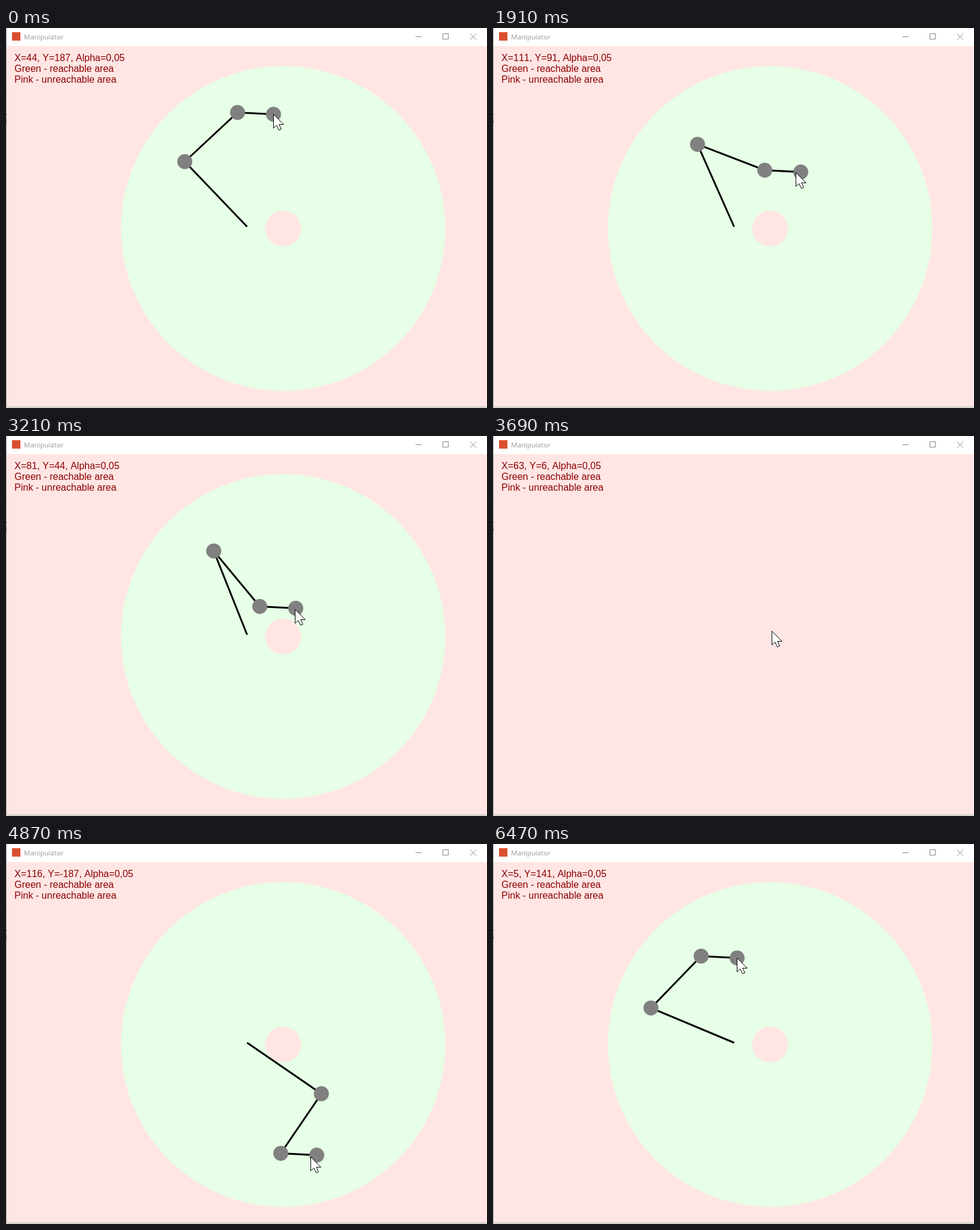
These frames come from a looping animation (801x632 px, 7180 ms). An HTML page:

```html
<!DOCTYPE html>
<html lang="en">
<head>
<meta charset="utf-8">
<title>Manipulator</title>
<style>
  html, body { margin: 0; width: 100%; height: 100%; overflow: hidden; background: #fff; }
  svg { display: block; width: 801px; height: 632px; }
  .title { font: 11.5px "Open Sans", "Noto Sans", sans-serif; fill: #999; }
  .info { font: 16px "Liberation Sans", Arial, sans-serif; font-kerning: none; fill: #8b0000; }
  .pink { fill: #ffe6e4; }
  .buttons { fill: none; stroke: #888; }
  #bones { fill: none; stroke: #000; stroke-width: 3; }
  #joints { fill: #808080; }
  #cursor { fill: #fff; stroke: #000; }
</style>
</head>
<body>
<svg viewBox="0 0 801 632">
  <rect width="801" height="632" fill="#fff"/>
  <rect x="10" y="7" width="14" height="14" fill="#d9502e"/>
  <text class="title" x="30" y="19">Manipulator</text>
  <g class="buttons">
    <path d="M682 14.5H692"/>
    <rect x="727.5" y="9.5" width="9" height="9"/>
    <path d="M773 9.5L783 19.5M783 9.5L773 19.5"/>
  </g>
  <rect class="pink" x="1" y="30" width="800" height="600"/>
  <g id="arm">
    <circle cx="461.5" cy="333.5" r="270" fill="#e6ffe6"/>
    <circle class="pink" cx="461.5" cy="333.5" r="30"/>
    <path id="bones"/>
    <g id="joints"><circle r="12.5"/><circle r="12.5"/><circle r="12.5"/></g>
  </g>
  <path d="M.5 0V631M0 630.5H801" stroke="#a0a0a0" fill="none"/>
  <path d="M.5 111v1M.5 143v2M.5 150v1M.5 154v4" stroke="#444" fill="none"/>
  <g class="info">
    <text id="pose" x="14" y="55"></text>
    <text x="14" y="73">Green - reachable area</text>
    <text x="14" y="91">Pink - unreachable area</text>
  </g>
  <path id="cursor" d="M.5 .5V23.5L5.7 18.8L9.5 26.8L13.3 25.2L9.8 17.5H17.3Z"/>
</svg>
<script>
const LOOP = 7180, STEP = 70, LEAD = 13;
const UPPER = 150, FORE = 120, PALM = 60, ALPHA = 0.05;
const BASE = { x: 401.5, y: 330.5 };

// Turning points of the mouse: time, x, y (y up, from the shoulder); a repeat is a pause
const keys = [
  [0, 44, 187], [580, 44, 187], [930, 94, 198], [1210, 86, 221], [1420, 70, 228],
  [1840, 123, 97], [1910, 111, 91], [1980, 60, 86], [2600, 53, -24], [2720, 53, -24],
  [2860, 55, -5], [3000, 88, 60], [3560, 63, 6], [3690, 63, 6], [4110, 31, 145],
  [4530, 203, 125], [4740, 232, -80], [4870, 116, -187], [5010, 30, -158],
  [5360, -86, -37], [5770, 10, 190], [5900, 10, 190], [6470, 5, 141], [LOOP, 5, 141]
];

const $ = id => document.getElementById(id);
const joints = $('joints').children;

const keyBefore = t => keys.findLastIndex(k => k[0] <= t);
const still = (a, b) => a[1] === b[1] && a[2] === b[2];

function slope(i, axis) {
  const a = keys[i - 1], p = keys[i], b = keys[i + 1];
  if (!a || !b || still(a, p) || still(p, b)) return 0;
  return (b[axis] - a[axis]) / (b[0] - a[0]);
}

// Cubic Hermite spline through the keys
function mouseAt(t) {
  const i = keyBefore(t), a = keys[i], b = keys[i + 1];
  const d = b[0] - a[0], u = (t - a[0]) / d;
  const mix = axis =>
    a[axis] * (1 + 2 * u) * (1 - u) ** 2 + b[axis] * u * u * (3 - 2 * u) +
    d * u * (1 - u) * (slope(i, axis) * (1 - u) - slope(i + 1, axis) * u);
  return { x: Math.round(mix(1)), y: Math.round(mix(2)) };
}

const polar = (r, a) => ({ x: r * Math.cos(a), y: r * Math.sin(a) });
const toScreen = p => ({ x: BASE.x + p.x, y: BASE.y - p.y });

// Elbow, wrist and palm end, or null when out of reach
function solve(end) {
  const palm = polar(PALM, -ALPHA);
  const wrist = { x: end.x - palm.x, y: end.y - palm.y };
  const d = Math.hypot(wrist.x, wrist.y);
  if (d < UPPER - FORE || d > UPPER + FORE) return null;
  const inner = Math.acos((UPPER ** 2 + d ** 2 - FORE ** 2) / (2 * UPPER * d));
  const elbow = polar(UPPER, Math.atan2(wrist.y, wrist.x) + inner);
  return [elbow, wrist, end].map(toScreen);
}

function draw(t) {
  const from = keys[keyBefore(t)][0];
  const time = from + Math.floor((t - from) / STEP) * STEP;
  const end = mouseAt(time), points = solve(end);

  $('pose').textContent = `X=${end.x}, Y=${end.y}, Alpha=0,05`;
  $('arm').style.display = points ? '' : 'none';
  if (points) {
    $('bones').setAttribute('d', 'M' + [BASE, ...points].map(p => `${p.x} ${p.y}`).join('L'));
    points.forEach((p, i) => {
      joints[i].setAttribute('cx', p.x);
      joints[i].setAttribute('cy', p.y);
    });
  }
  // The pointer runs slightly ahead of the arm
  const tip = toScreen(mouseAt(time + LEAD));
  $('cursor').setAttribute('transform', `translate(${tip.x - 0.5} ${tip.y - 0.5})`);
}

const start = performance.now();
function tick() {
  draw((performance.now() - start) % LOOP);
  requestAnimationFrame(tick);
}
tick();
</script>
</body>
</html>
```
